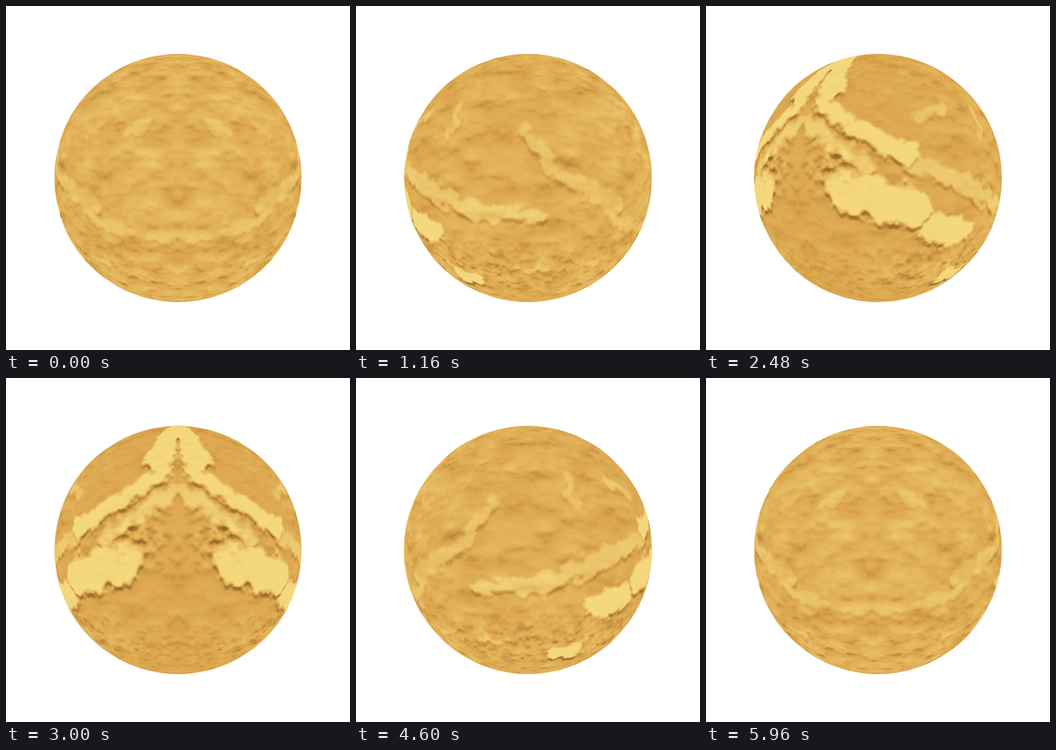
Recreate the animation shown at these times as an HTML page with a canvas. Size 512 by 512 pixels, loop 6 s.

```html
<!DOCTYPE html>
<html lang="en">
<head>
<meta charset="utf-8">
<title>Turning planet</title>
<style>
  html, body { margin: 0; width: 100%; height: 100%; overflow: hidden; background: #fff; }
  canvas { display: block; width: 100vw; height: 100vh; }
</style>
</head>
<body>
<canvas id="stage" width="512" height="512"></canvas>
<script>
const LOOP = 6000, STEP = 40;
const SIZE = 512, MID = SIZE / 2, FOCAL = 620, DIST = 3.5;
const RES = 3;                       // map cells per degree
const LAT = 78;                      // map covers -LAT..LAT
const COLS = 180 * RES + 2, ROWS = 2 * LAT * RES + 2;
const RAD = Math.PI / 180;
const clamp = (v, a, b) => Math.min(b, Math.max(a, v));
const smooth = t => t * t * (3 - 2 * t);
const bump = (x, y) => Math.exp(-x * x - y * y);

// Main highlands: half width, height, then key points (longitude 0..180, latitude).
// The map is mirrored onto the other half of the globe.
const highlands = [
  [6.5, 1, 4, 62, 9, 37],
  [3.4, 1, 5, 31, 21, 19, 42, 8],
  [3.5, .6, 42, 6, 98, -14],
  [2.6, .7, 2, 22, 28, 3],
  [7, 1, 20, -4, 44, -11],
  [6, 1, 54, -20, 67, -20],
  [4.5, 1, 70, -43, 83, -43],
  [2, .5, 46, 22, 60, 28],
  [1.8, .45, 79, 17, 79, 29],
  [2.2, .7, 96, -11, 115, -13],
  [2.5, .45, 109, 18, 120, 2, 147, -10],
  [2, .35, 141, -9, 149, -18, 180, -21],
  [2.5, .35, 162, 16, 168, 20]
];

function hash(x, y) {
  let h = Math.imul(x, 374761393) + Math.imul(y, 668265263);
  h = Math.imul(h ^ (h >>> 13), 1274126177);
  return ((h ^ (h >>> 16)) >>> 0) / 4294967296;
}
function noise(x, y) {
  const i = Math.floor(x), j = Math.floor(y), u = smooth(x - i), v = smooth(y - j);
  const a = hash(i, j), b = hash(i + 1, j), c = hash(i, j + 1), d = hash(i + 1, j + 1);
  return a + (b - a) * u + (c - a + (a - b - c + d) * u) * v;
}
// Layered noise centred on zero
function fbm(x, y, octaves) {
  let sum = 0, amp = .5;
  for (let k = 0; k < octaves; k++) {
    sum += (noise(x, y) - .5) * amp;
    x = x * 2 + 17;
    y = y * 2 + 31;
    amp /= 2;
  }
  return sum;
}

function segmentDistance(px, py, ax, ay, bx, by) {
  const dx = bx - ax, dy = by - ay;
  const k = clamp(((px - ax) * dx + (py - ay) * dy) / (dx * dx + dy * dy), 0, 1);
  return Math.hypot(px - ax - dx * k, py - ay - dy * k);
}

// Plateau with a ragged rim
function plateau(lon, lat, [width, height, ...p]) {
  let d = Infinity;
  for (let i = 0; i + 3 < p.length; i += 2)
    d = Math.min(d, segmentDistance(lon, lat, p[i], p[i + 1], p[i + 2], p[i + 3]));
  return height * smooth(clamp((width + 1.2 - d) / 2.4, 0, 1));
}

// Rolling ground everywhere, broken ground in the foothills and the southern belt
function ground(lon, lat) {
  const belt = .6 * bump((lon - 85) / 75, (lat + 38) / 12);
  const foothills = bump((lon - 15) / 11, (lat - 4) / 9);
  const rolling = (.5 + lon / 250) * fbm(lon / 9 + 7, lat / 4.5 + 200, 5);
  const broken = 2.2 * (.1 + belt + foothills) * fbm(lon / 3.2 + 40, lat / 2.5 + 300, 3);
  return lon / 700 + rolling + broken;
}

function buildMap() {
  const height = new Float32Array(COLS * ROWS), map = new Float32Array(COLS * ROWS);
  const reach = 5;                   // shadow length in rows
  for (let r = 0, n = 0; r < ROWS; r++) {
    const lat = LAT - r / RES;
    for (let c = 0; c < COLS; c++, n++) {
      const lon = c / RES;
      const x = lon + 7 * fbm(lon / 4.5, lat / 4 + 50, 4);
      const y = lat + 7 * fbm(lon / 4.5 + 90, lat / 4, 4);
      let top = 0;
      for (const land of highlands) top = Math.max(top, plateau(x, y, land));
      height[n] = top + ground(lon, lat) * (1 - .4 * top);

      // Light from the north: high ground throws a shadow southwards
      const drop = r < reach ? 0 : Math.max(0, height[n - reach * COLS] - height[n]);
      const depth = .75 + 1.2 * fbm(lon / 6 + 60, lat / 5 + 80, 2);
      map[n] = clamp(height[n] - depth * drop, -1, 1);
    }
  }
  return map;
}

// Colour ramp, packed for a little-endian pixel buffer
const dark = [148, 103, 43], base = [219, 166, 78], light = [244, 216, 126];
const ramp = Uint32Array.from({ length: 513 }, (_, i) => {
  const v = i / 256 - 1, end = v < 0 ? dark : light;
  const [r, g, b] = base.map((from, j) => Math.round(from + (end[j] - from) * Math.abs(v)));
  return (255 << 24 | b << 16 | g << 8 | r) >>> 0;
});

// Longitude and map row seen through each pixel of the globe
const BOX = 374, EDGE = (SIZE - BOX) / 2;
const seenLon = new Float32Array(BOX * BOX), seenRow = new Float32Array(BOX * BOX);
for (let j = 0, n = 0; j < BOX; j++) {
  for (let i = 0; i < BOX; i++, n++) {
    const x = (i + EDGE + .5 - MID) / FOCAL, y = (MID - j - EDGE - .5) / FOCAL;
    const a = 1 + x * x + y * y;
    const root = Math.sqrt(Math.max(0, DIST * DIST - a * (DIST * DIST - 1)));
    const t = (DIST - root) / a;
    seenLon[n] = Math.atan2(x * t, DIST - t) / RAD;
    const lat = Math.asin(clamp(y * t, -1, 1)) / RAD;
    seenRow[n] = clamp((LAT - lat) * RES, 0, ROWS - 1.01);
  }
}

// Outline of the 32 x 32 mesh: convex hull of its projected corners
function outline(turn) {
  const pts = [];
  for (let i = 0; i < 32; i++) {
    const lon = (i * 11.25 + turn) * RAD;
    for (let j = -15; j <= 15; j++) {
      const lat = j * 5.625 * RAD;
      const s = FOCAL / (DIST - Math.cos(lat) * Math.cos(lon));
      pts.push([MID + s * Math.cos(lat) * Math.sin(lon), MID - s * Math.sin(lat)]);
    }
  }
  pts.sort((a, b) => a[0] - b[0] || a[1] - b[1]);
  const half = list => {
    const h = [];
    for (const p of list) {
      while (h.length > 1) {
        const a = h[h.length - 2], b = h[h.length - 1];
        if ((b[0] - a[0]) * (p[1] - a[1]) - (b[1] - a[1]) * (p[0] - a[0]) > 0) break;
        h.pop();
      }
      h.push(p);
    }
    return h;
  };
  return [...half(pts), ...half(pts.reverse())];
}

const map = buildMap();
const ctx = document.getElementById('stage').getContext('2d');
const globe = document.createElement('canvas');
globe.width = globe.height = BOX;
const globeCtx = globe.getContext('2d');
const image = globeCtx.createImageData(BOX, BOX);
const pixels = new Uint32Array(image.data.buffer);

function draw(turn) {
  for (let n = 0; n < pixels.length; n++) {
    let lon = seenLon[n] - turn + 180;
    if (lon > 180) lon -= 360;
    else if (lon < -180) lon += 360;
    const x = Math.abs(lon) * RES, y = seenRow[n];
    const c = x | 0, r = y | 0, u = x - c, k = r * COLS + c;
    const top = map[k] + (map[k + 1] - map[k]) * u;
    const low = map[k + COLS] + (map[k + COLS + 1] - map[k + COLS]) * u;
    pixels[n] = ramp[(top + (low - top) * (y - r) + 1) * 256 | 0];
  }
  globeCtx.putImageData(image, 0, 0);

  ctx.fillStyle = '#fff';
  ctx.fillRect(0, 0, SIZE, SIZE);
  ctx.save();
  ctx.beginPath();
  for (const [x, y] of outline(turn)) ctx.lineTo(x, y);
  ctx.closePath();
  ctx.clip();
  ctx.drawImage(globe, EDGE, EDGE);
  ctx.restore();
}

let shown = -1;
function tick() {
  const step = Math.floor(performance.now() % LOOP / STEP);
  if (step !== shown) {
    shown = step;
    draw(step * STEP / LOOP * 360);
  }
  requestAnimationFrame(tick);
}
tick();
</script>
</body>
</html>
```
